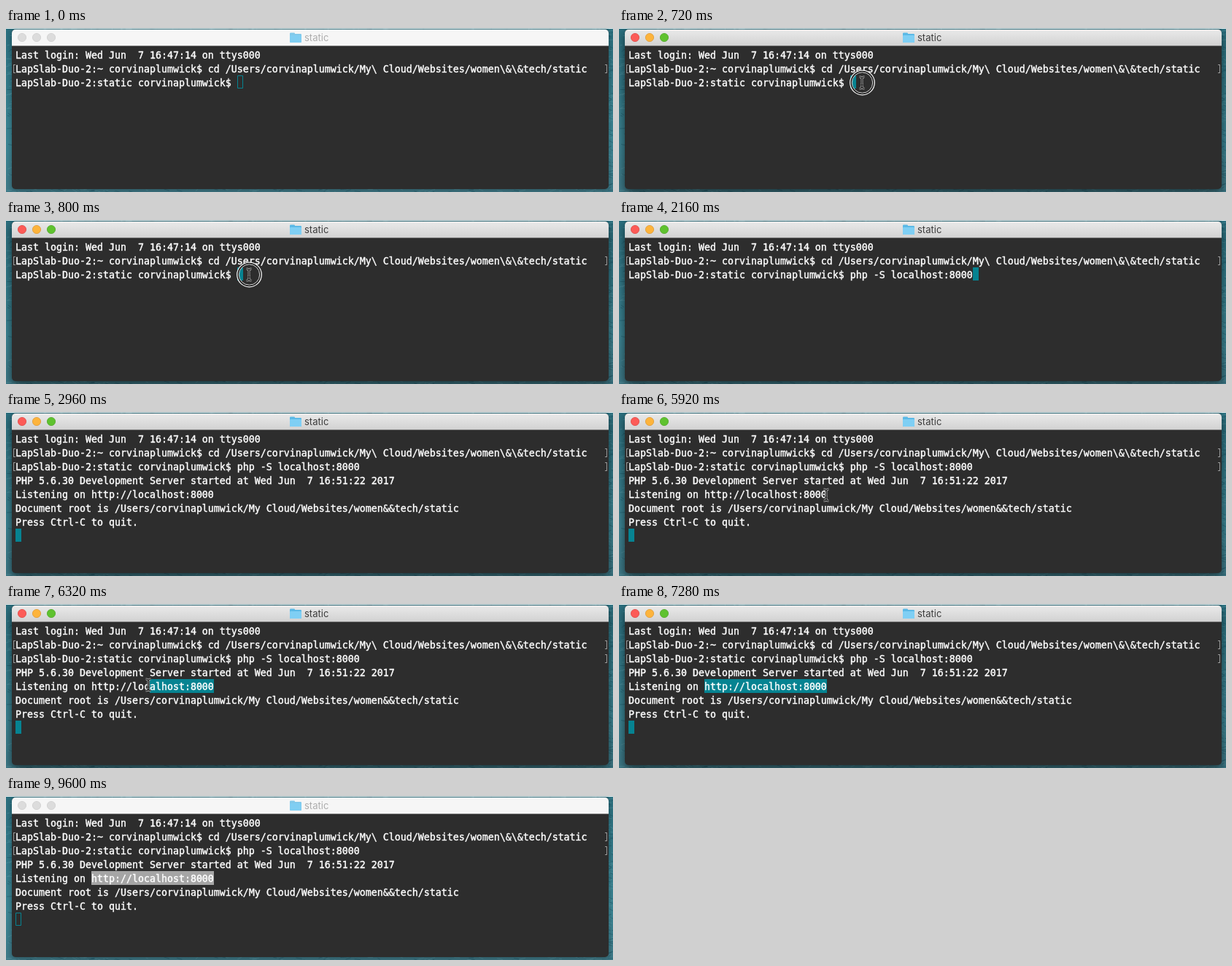
Recreate the animation shown at these times as an HTML page with a canvas. Size 832 by 225 pixels, loop 9680 ms.

```html
<!DOCTYPE html>
<html lang="en">
<head>
<meta charset="utf-8">
<title>Terminal</title>
<style>
html, body { margin: 0; width: 100%; height: 100%; overflow: hidden; background: #2b6c7b; }
canvas { display: block; width: 832px; height: 225px; }
</style>
</head>
<body>
<canvas id="stage" width="832" height="225"></canvas>
<script>
const W = 832, H = 225, LOOP = 9680, STEP = 80;
const COL = 8, ROW = 19, LEFT = 13, TOP = 27;
const TEAL = '#068391';
const ctx = document.getElementById('stage').getContext('2d');

const USER = 'corvinaplumwick', HOST = 'LapSlab-Duo-2';
const LOGIN = [
  'Last login: Wed Jun  7 16:47:14 on ttys000',
  `${HOST}:~ ${USER}$ cd /Users/${USER}/My\\ Cloud/Websites/women\\&\\&tech/static`
];
const PROMPT = `${HOST}:static ${USER}$ `;
const COMMAND = 'php -S localhost:8000';
const OUTPUT = [
  'PHP 5.6.30 Development Server started at Wed Jun  7 16:51:22 2017',
  'Listening on http://localhost:8000',
  `Document root is /Users/${USER}/My Cloud/Websites/women&&tech/static`,
  'Press Ctrl-C to quit.'
];
const URL_ROW = 4, URL_START = 13, URL_END = 34;

const FOCUS = 720, RING_END = 960, PASTE = 2160, ENTER = 2800, REPLY = 2960;
const DRAG = 5920, DROP = 6720, BLUR = 9600;

// Pointer moves: start, end, from x, y, to x, y
const MOVES = [
  [320, 640, 520, 214, 333, 75],
  [960, 1360, 333, 75, 706, 240],
  [5360, 5840, 683, 213, 284, 114],
  [5920, 6320, 284, 114, 195, 111],
  [6320, 6720, 195, 111, 115, 112],
  [7040, 7280, 115, 112, 60, 240]
];
const HIDDEN = [[0, 320], [1360, 5360], [7280, LOOP]];

const lerp = (a, b, k) => a + (b - a) * k;
const smooth = k => k * k * (3 - 2 * k);

function pointerAt(t) {
  if (HIDDEN.some(([a, b]) => t >= a && t < b)) return null;
  const [a, b, x0, y0, x1, y1] = MOVES.filter(m => m[0] <= t).pop();
  const k = smooth(Math.min(1, (t - a) / (b - a)));
  return { x: Math.round(lerp(x0, x1, k)), y: Math.round(lerp(y0, y1, k)) };
}

function rect(x, y, w, h, fill) {
  ctx.fillStyle = fill;
  ctx.fillRect(x, y, w, h);
}

function circle(x, y, r, fill, stroke, width = 1) {
  ctx.beginPath();
  ctx.arc(x, y, r, 0, Math.PI * 2);
  if (fill) { ctx.fillStyle = fill; ctx.fill(); }
  if (stroke) { ctx.strokeStyle = stroke; ctx.lineWidth = width; ctx.stroke(); }
}

function makeWater() {
  const c = document.createElement('canvas');
  c.width = W;
  c.height = H;
  const g = c.getContext('2d');
  let seed = 17;
  const rnd = () => (seed = seed * 16807 % 2147483647) / 2147483647;
  const depth = g.createLinearGradient(0, 0, 0, H);
  depth.addColorStop(0, '#2b6f7e');
  depth.addColorStop(0.7, '#3d8796');
  depth.addColorStop(1, '#3f7a88');
  g.fillStyle = depth;
  g.fillRect(0, 0, W, H);
  for (let i = 0; i < 4200; i++) {
    const x = rnd() * W, y = rnd() * H, len = 3 + rnd() * 7;
    g.strokeStyle = rnd() < 0.5 ? 'rgba(22,76,92,.4)' : 'rgba(110,172,182,.32)';
    g.beginPath();
    g.moveTo(x, y);
    g.lineTo(x + len, y + (rnd() - 0.5) * 7);
    g.stroke();
  }
  return c;
}
const water = makeWater();

function drawFolder(x, y, active) {
  ctx.globalAlpha = active ? 1 : 0.75;
  ctx.fillStyle = '#5bb9e6';
  ctx.beginPath();
  ctx.roundRect(x, y, 7, 5, 1.2);
  ctx.roundRect(x, y + 1.5, 16, 12, 1.2);
  ctx.fill();
  ctx.fillStyle = '#7fcff4';
  ctx.beginPath();
  ctx.roundRect(x, y + 3.5, 16, 10, 1.2);
  ctx.fill();
  ctx.globalAlpha = 1;
}

function drawWindow(active) {
  ctx.drawImage(water, 0, 0);
  ctx.save();
  ctx.shadowColor = `rgba(0,0,0,${active ? 0.6 : 0.35})`;
  ctx.shadowBlur = active ? 14 : 8;
  ctx.shadowOffsetY = active ? 5 : 2;
  ctx.fillStyle = '#2d2d2d';
  ctx.beginPath();
  ctx.roundRect(8, 2, 818, 219, 5);
  ctx.fill();
  ctx.restore();
  rect(0, 0, W, 1, '#f4f6f6');

  ctx.save();
  ctx.beginPath();
  ctx.roundRect(8, 2, 818, 219, 5);
  ctx.clip();
  const bar = ctx.createLinearGradient(0, 2, 0, 24);
  bar.addColorStop(0, active ? '#eaeaea' : '#f6f6f6');
  bar.addColorStop(1, active ? '#d2d2d2' : '#f6f6f6');
  rect(8, 2, 818, 22, bar);
  rect(8, 24, 818, 1, active ? '#777' : '#8c8c8c');
  ctx.restore();

  const lights = [['#fc5b57', '#df4744'], ['#fdb43c', '#e09a34'], ['#5fc22f', '#4fa826']];
  lights.forEach(([fill, edge], i) =>
    circle(22 + i * 20, 13, 5.6, active ? fill : '#dcdcdc', active ? edge : '#cecece', 0.8));

  drawFolder(389, 6.5, active);
  ctx.font = '13px Inter, sans-serif';
  ctx.fillStyle = active ? '#3c3c3c' : '#adadad';
  ctx.fillText('static', 409, 18);
}

function drawBrackets(row) {
  const y = TOP + row * ROW + 4;
  for (const [x, tick] of [[10, 10], [823, 821]]) {
    rect(x, y, 1, 12, '#989898');
    rect(tick, y, 3, 1, '#989898');
    rect(tick, y + 11, 3, 1, '#989898');
  }
}

function drawCursor(col, row, active) {
  const x = LEFT + col * COL, y = TOP + row * ROW, h = ROW - 1;
  if (active) {
    rect(x, y, COL, h, TEAL);
  } else {
    ctx.strokeStyle = TEAL;
    ctx.lineWidth = 1;
    ctx.strokeRect(x + 0.5, y + 0.5, COL - 1, h - 1);
  }
}

function drawSelection(t, pointer, active) {
  if (t < DRAG) return;
  let start = URL_START;
  if (t < DROP) {
    start = Math.round((pointer.x - LEFT) / COL);
    start = Math.max(URL_START, Math.min(URL_END, start));
  }
  rect(LEFT + start * COL, TOP + URL_ROW * ROW, (URL_END - start) * COL, ROW,
    active ? TEAL : '#a5a5a5');
}

function drawText(line, row) {
  const y = TOP + row * ROW + 15;
  ctx.fillText(line, LEFT, y);
  ctx.strokeText(line, LEFT, y);
}

function drawTerminal(t, pointer, active) {
  const lines = [...LOGIN, PROMPT + (t >= PASTE ? COMMAND : '')];
  if (t >= REPLY) lines.push(...OUTPUT);
  const sent = t >= ENTER;
  drawBrackets(1);
  if (sent) drawBrackets(2);
  drawSelection(t, pointer, active);
  drawCursor(sent ? 0 : lines[2].length, sent ? lines.length : 2, active);
  ctx.font = '13.29px "DejaVu Sans Mono", monospace';
  ctx.fillStyle = ctx.strokeStyle = '#fff';
  ctx.lineWidth = 0.4;
  ctx.lineJoin = 'round';
  lines.forEach(drawText);
}

function drawPointer({ x, y }, ring) {
  if (ring) {
    circle(x + 0.5, y, 15.3, null, '#1c1c1c', 3);
    circle(x + 0.5, y, 16.8, null, '#f4f4f4', 1.3);
    circle(x + 0.5, y, 14.2, null, '#d8d8d8', 1);
  }
  ctx.beginPath();
  for (const s of [-1, 1]) {
    ctx.moveTo(x - 3.5, y + s * 8);
    ctx.quadraticCurveTo(x, y + s * 8, x, y + s * 5);
    ctx.quadraticCurveTo(x, y + s * 8, x + 3.5, y + s * 8);
  }
  ctx.moveTo(x, y - 5);
  ctx.lineTo(x, y + 5);
  ctx.moveTo(x - 2, y + 3);
  ctx.lineTo(x + 2, y + 3);
  for (const [color, width] of [['#9c9c9c', 3], ['#1c1c1c', 1.2]]) {
    ctx.strokeStyle = color;
    ctx.lineWidth = width;
    ctx.stroke();
  }
}

function draw(now) {
  const t = Math.floor((now % LOOP) / STEP) * STEP;
  const active = t >= FOCUS && t < BLUR;
  const pointer = pointerAt(t);
  drawWindow(active);
  drawTerminal(t, pointer, active);
  if (pointer) drawPointer(pointer, t >= FOCUS && t < RING_END);
}

const begin = performance.now();
function tick() {
  draw(performance.now() - begin);
  requestAnimationFrame(tick);
}
tick();
</script>
</body>
</html>
```
